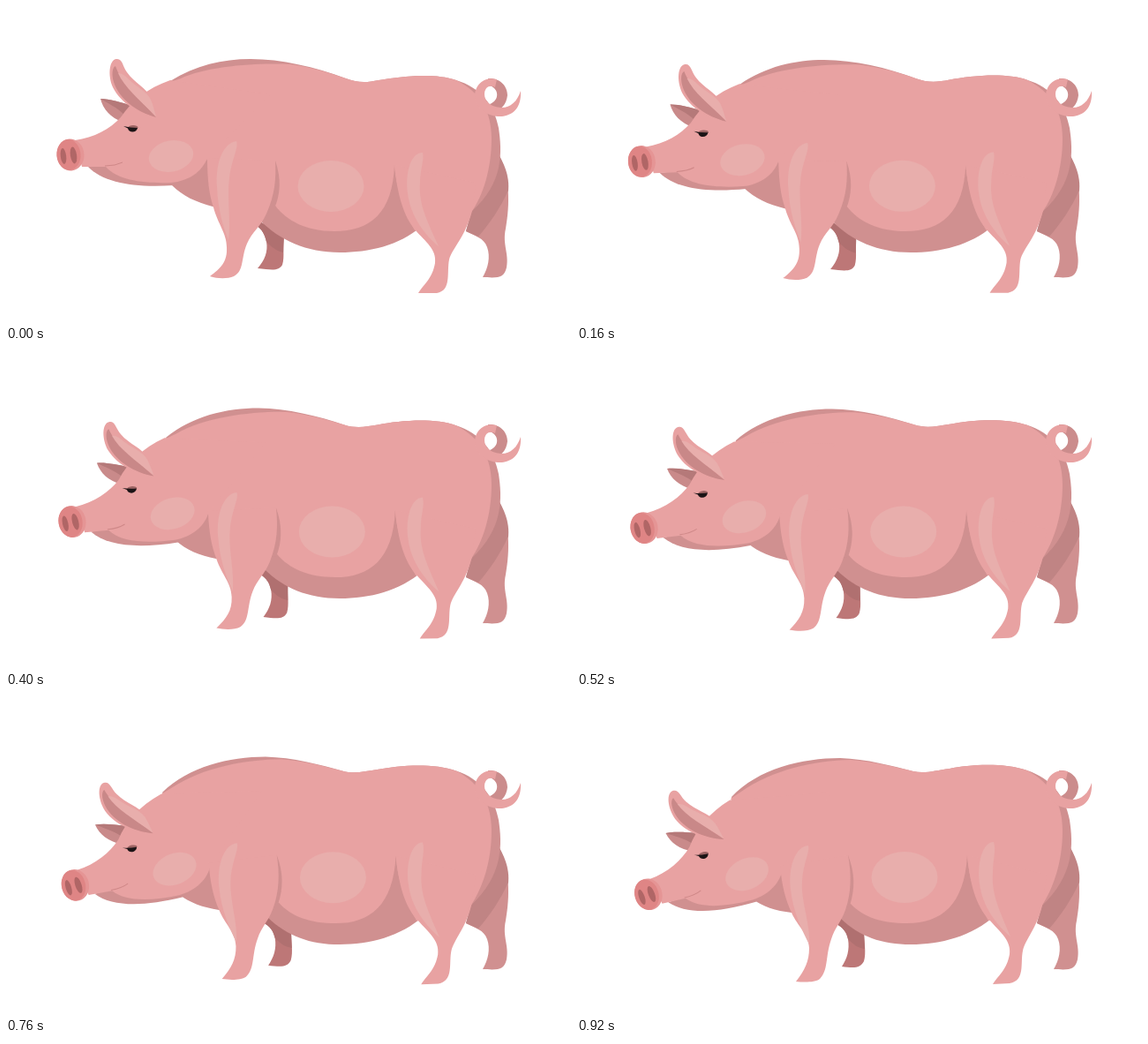
An HTML page with a canvas for the animation above (0.96 s loop, 640 by 360 pixels).

```html
<!DOCTYPE html>
<html lang="en">
<head>
<meta charset="utf-8">
<title>Pig lowering its head</title>
<style>
  html, body { margin: 0; width: 100%; height: 100%; overflow: hidden; background: #fff; }
  canvas { display: block; }
</style>
</head>
<body>
<canvas id="stage" width="640" height="360"></canvas>
<script>
const ctx = document.getElementById("stage").getContext("2d");
const LOOP = 960, STEP = 40;
const PINK = "#e8a2a2", SHADE = "#d09090", LIGHT = "#e8aeac", DEEP = "#c08484";
const NECK = { x: 320, y: 164, dx: 1.2, dy: .8, turn: -12.4 * Math.PI / 180 };

// [step, progress] stops of the lowering movement
const STOPS = [[0, 0], [4, .14], [7, .285], [10, .435], [15, .655], [19, .805], [23, 1]];
let pose = 0;

function progress(step) {
  const i = Math.max(1, STOPS.findIndex(([s]) => s >= step));
  const [s0, p0] = STOPS[i - 1], [s1, p1] = STOPS[i];
  return p0 + (p1 - p0) * (step - s0) / (s1 - s0);
}

const mix = (a, b) => a + (b - a) * pose;

// Blends two paths that share the same commands
function blend(up, down) {
  const ends = down.match(/[\d.]+/g);
  let i = 0;
  return up.replace(/[\d.]+/g, n => mix(+n, +ends[i++]));
}

function shape(color, up, down = up) {
  ctx.fillStyle = color;
  ctx.fill(new Path2D(blend(up, down)));
}

function oval(color, x, y, rx, ry, angle = 0) {
  ctx.fillStyle = color;
  ctx.beginPath();
  ctx.ellipse(x, y, rx, ry, angle, 0, 7);
  ctx.fill();
}

function line(color, width, d) {
  ctx.strokeStyle = color;
  ctx.lineWidth = width;
  ctx.stroke(new Path2D(d));
}

function farLegs() {
  shape(SHADE, "M558 168 C571 192 571 225 566 252 C562 270 570 280 567 296 C564 308 558 308 540 307 C546 297 549 284 545 273 C541 262 532 261 521 255 L528 230 Z");
  shape(DEEP, "M558 168 C568 185 570 198 569 209 C560 228 549 245 535 261 L521 255 L528 230 Z");
  shape("#bd7777",
    "M284 242 L315 260 C313 272 316 284 313 293 C309 300 302 299 285 297 C293 288 297 278 295 267 C293 258 290 253 284 249 Z",
    "M293 245 L325 264 C325 276 328 288 325 298 C321 306 314 306 300 304 C306 295 309 285 307 273 C305 264 301 260 294 256 Z");
  shape("#b07070",
    "M284 242 L315 260 L314 279 C306 277 301 273 295 267 C293 258 290 253 284 249 Z",
    "M293 245 L325 264 L326 284 C318 283 313 279 307 273 C305 264 301 260 294 256 Z");
}

function body() {
  shape(SHADE,
    "M186 85 C215 67 245 60 277 60 C312 60 350 69 385 82 C398 87 408 87 422 84 C445 80 485 75 510 84 C537 92 553 112 558 138 C562 165 564 200 528 232 L470 250 C445 271 412 279 378 279 C340 279 310 265 288 243 L234 227 C215 222 200 215 188 203 Z",
    "M175 112 C205 80 255 68 298 68 C328 69 358 77 381 83 C394 86 406 82 422 80 C445 75 485 73 510 82 C537 91 553 111 558 138 C562 165 564 200 526 236 L474 246 C447 270 412 279 378 279 C345 279 320 270 299 250 L243 243 C225 241 210 236 198 227 Z");
  shape(PINK,
    "M184 87 L198 82 C228 68 285 64 322 66 C345 69 365 75 385 82 C398 87 408 87 422 84 C445 80 485 75 510 84 C538 98 550 120 550 150 C550 185 540 215 528 232 L463 254 C450 230 442 205 440 180 C438 235 412 255 372 255 C340 255 318 243 305 226 L250 240 L228 175 Z",
    "M174 114 L186 106 C222 81 268 71 310 70 C335 72 361 78 381 83 C394 86 406 82 422 80 C445 75 485 73 510 82 C538 97 550 120 550 150 C550 185 540 215 526 236 L466 252 C452 230 444 205 442 178 C439 235 412 255 374 255 C345 255 324 248 310 233 L257 245 L231 192 Z");
  shape(SHADE,
    "M305 175 C312 195 311 213 304 229 L292 229 Z",
    "M307 178 C315 198 315 216 309 235 L297 235 Z");
  oval(LIGHT, mix(368, 371), mix(204, 203), 37.5, 29);
}

function nearLegs() {
  shape(PINK,
    "M228 172 C228 196 230 213 235 228 C240 247 250 257 250 273 C251 290 243 297 231 306 C240 309 251 309 258 306 C270 300 266 285 273 269 C279 255 288 251 295 235 C305 213 306 195 305 175 Z",
    "M230 190 C232 212 236 228 243 243 C250 259 262 266 263 283 C263 298 258 308 248 321 C258 322 270 322 275 318 C285 308 281 293 288 273 C292 260 299 254 304 240 C311 220 311 199 307 178 Z");
  shape(LIGHT,
    "M261 153 C245 155 237 180 239 205 C240 230 246 250 252 265 C255 245 250 215 253 195 C255 175 264 160 261 153 Z",
    "M262 167 C247 168 239 192 242 217 C245 243 255 263 263 279 C265 258 253 228 255 207 C256 188 264 174 262 167 Z");
  shape(PINK,
    "M440 180 C443 212 450 238 464 254 C475 267 488 275 486 291 C483 308 475 313 467 325 L488 325 C505 322 499 302 502 287 C505 275 520 262 528 232 L532 200 Z",
    "M442 178 C445 210 452 236 467 251 C479 265 492 274 490 290 C487 307 479 312 471 324 L490 323 C508 320 502 300 505 286 C508 273 521 260 527 235 L532 200 Z");
  shape(LIGHT,
    "M472 166 C458 166 452 190 455 212 C458 238 475 260 490 272 C478 245 467 225 469 200 C469 185 474 175 472 166 Z",
    "M472 163 C459 163 453 188 456 210 C459 236 476 258 491 270 C480 243 469 223 471 198 C471 183 475 173 472 163 Z");
}

function tail() {
  shape("#cb8c8c", "M546 82 C560 81 568 91 568 101 C567 111 561 118 552 120 L548 111 C559 107 559 94 548 90 Z");
  shape(PINK, "M556 83 C540 79 531 91 531 102 C532 118 548 126 562 125 C578 123 584 111 583 96 C579 109 570 116 560 115 C548 114 542 107 542 100 C542 92 548 89 554 92 Z");
}

function head() {
  ctx.save();
  ctx.translate(NECK.x + NECK.dx * pose, NECK.y + NECK.dy * pose);
  ctx.rotate(NECK.turn * pose);
  ctx.translate(-NECK.x, -NECK.y);

  shape("#c98a8a", "M107 105 C117 105 130 109 143 113 L133 132 C118 126 110 117 107 105 Z");
  shape("#b57979", "M107 105 C117 105 130 109 143 113 L134 123 C126 115 115 110 107 105 Z");
  shape(SHADE, "M93 182 C110 200 145 206 190 203 L206 192 L113 180 Z");
  shape(PINK, "M78 152 C100 149 118 139 130 126 C142 108 160 93 186 84 L300 100 L228 172 C222 188 207 198 187 200 C158 201 127 198 113 182 L86 182 Z");
  oval(LIGHT, 187, 170, 25.5, 17.5, -.2);
  line("#cf8888", 1, "M112 181 Q124 181 132 177");

  oval("#e59595", 73, 168.5, 15.5, 18, -.08);
  oval("#df8585", 71, 168.5, 13.5, 17.5, -.08);
  oval("#b06666", 65, 170, 3.2, 9, -.12);
  oval("#b06666", 76.5, 169, 3.6, 9.5, -.15);

  oval("#9c6464", 144, 137.5, 5.5, 2.5);
  shape("#1c1416", "M133 136 Q141 138 149 138 C148 144 139 144 138 138.5 Z");

  shape(PINK, "M171 127 C150 122 130 110 121 92 C115 78 117 61 125 60 C132 59 132 68 137 75 C146 88 159 92 165 105 C169 113 169 120 171 127 Z");
  shape("#c98888", "M170 126 C148 120 128 105 122 86 C119 76 121 69 124 68 C130 86 148 102 170 126 Z");
  shape(LIGHT, "M170 125 C150 105 134 92 127 76 C132 76 136 80 139 83 C148 92 159 96 164 106 C167 113 168 119 170 125 Z");
  ctx.restore();
}

function draw(now) {
  pose = progress(Math.floor(now % LOOP / STEP));
  ctx.fillStyle = "#fff";
  ctx.fillRect(0, 0, 640, 360);
  farLegs();
  body();
  head();
  nearLegs();
  tail();
  requestAnimationFrame(draw);
}

draw(0);
</script>
</body>
</html>
```
